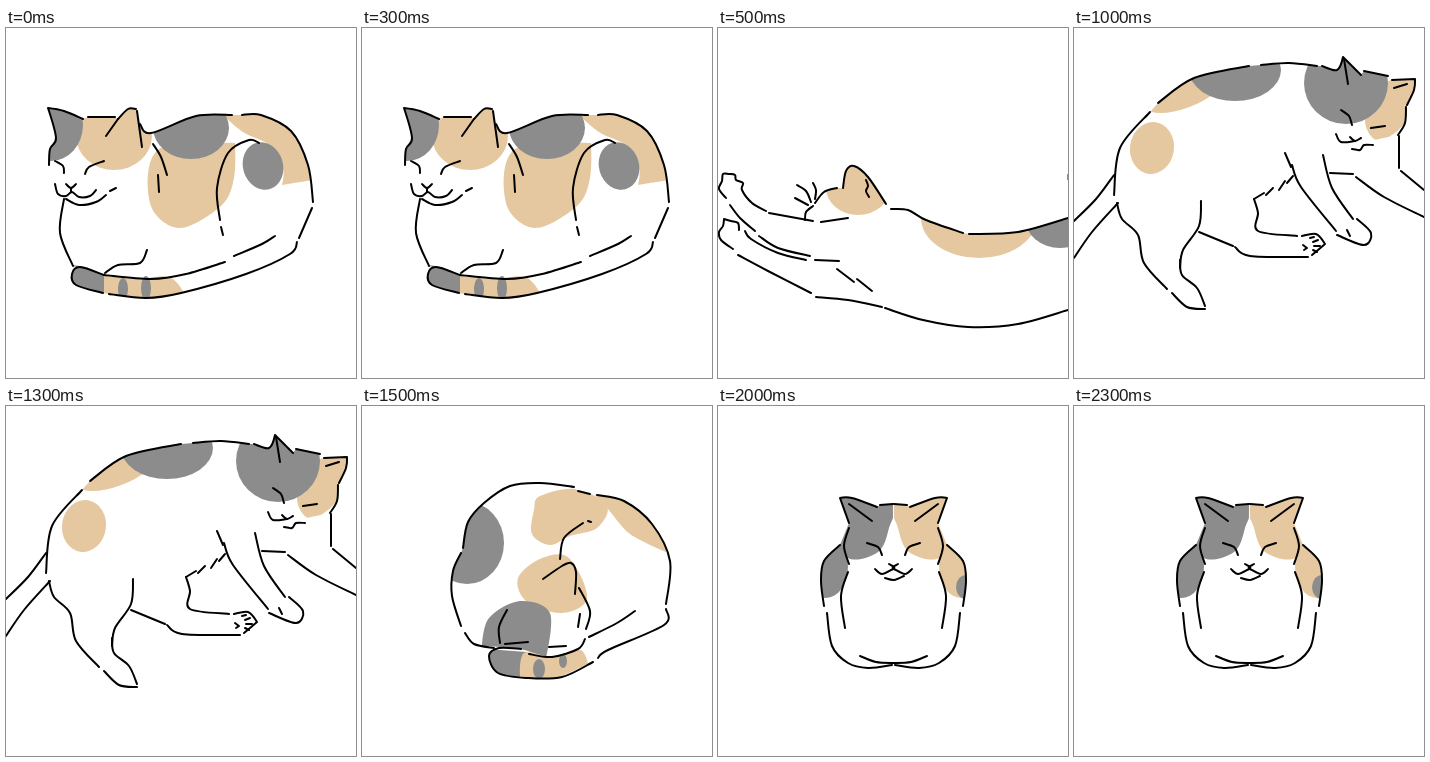
Recreate the animation shown at these times as an HTML page with a canvas. Size 350x350 px, loop 2.5 s.

```html
<!DOCTYPE html>
<html lang="en">
<head>
<meta charset="utf-8">
<title>Calico cat</title>
<style>
html, body { margin: 0; width: 100%; height: 100%; overflow: hidden; background: #fff; }
canvas { display: block; width: 100vw; height: 100vh; }
</style>
</head>
<body>
<canvas></canvas>
<script>
const SIZE = 350, HOLD = 500, GREY = '#8c8c8c', TAN = '#e5c8a0';
const canvas = document.querySelector('canvas');
const ctx = canvas.getContext('2d');
const ratio = window.devicePixelRatio || 1;
canvas.width = canvas.height = SIZE * ratio;
let region;

// Smooth curve through x,y pairs; turns sharper than a right angle stay corners.
function trace(path, coords, closed) {
  const n = coords.length / 2;
  const at = i => {
    const k = closed ? (i + n) % n : Math.max(0, Math.min(n - 1, i));
    return [coords[2 * k], coords[2 * k + 1]];
  };
  const handle = (i, side) => {
    const [ax, ay] = at(i - 1), [x, y] = at(i), [bx, by] = at(i + 1);
    const corner = (x - ax) * (bx - x) + (y - ay) * (by - y) < 0;
    const pull = corner ? 0 : side / 6;
    return [x + (bx - ax) * pull, y + (by - ay) * pull];
  };
  path.lineTo(...at(0));
  for (let i = 0; i < (closed ? n : n - 1); i++) {
    path.bezierCurveTo(...handle(i, 1), ...handle(i + 1, -1), ...at(i + 1));
  }
}

function ink(...coords) {
  const path = new Path2D();
  trace(path, coords);
  ctx.stroke(path);
}

// An ink line that also bounds the fur patches.
function edge(...coords) {
  ink(...coords);
  trace(region, coords);
}

// Patches lie below the ink and below earlier patches.
function paint(color, path) {
  ctx.save();
  ctx.clip(region);
  ctx.globalCompositeOperation = 'destination-over';
  ctx.fillStyle = color;
  ctx.fill(path);
  ctx.restore();
}

function patch(color, ...coords) {
  const path = new Path2D();
  trace(path, coords, true);
  paint(color, path);
}

function oval(color, x, y, rx, ry, turn = 0) {
  const path = new Path2D();
  path.ellipse(x, y, rx, ry, turn, 0, 2 * Math.PI);
  paint(color, path);
}

function poly(color, ...coords) {
  const path = new Path2D();
  for (let i = 0; i < coords.length; i += 2) path.lineTo(coords[i], coords[i + 1]);
  paint(color, path);
}

function loaf() {
  edge(43, 137, 44, 121, 50, 110, 42, 80, 58, 83, 77, 91);
  edge(82, 89, 109, 89);
  edge(112, 91, 122, 81, 130, 81);
  edge(134, 96, 145, 105, 190, 88, 226, 87);
  edge(236, 87, 255, 87, 285, 103, 302, 137, 307, 174);
  edge(306, 180, 293, 210);
  edge(291, 214, 284, 226, 240, 246, 175, 265, 140, 270, 103, 266);
  edge(97, 265, 70, 257, 66, 246, 74, 239, 98, 247);
  edge(67, 238, 54, 205, 58, 171);
  // face
  ink(100, 108, 112, 91);
  ink(131, 83, 136, 119);
  ink(49, 133, 57, 138, 58, 145);
  ink(79, 146, 83, 139, 98, 133);
  ink(60, 156, 65, 160, 70, 156);
  ink(65, 160, 65, 164);
  ink(49, 156, 52, 166, 60, 168, 66, 164, 73, 169, 84, 168, 90, 162);
  ink(60, 171, 73, 177, 90, 174, 100, 167);
  ink(104, 163, 110, 160);
  // body and tail
  ink(147, 116, 155, 129, 161, 147);
  ink(152, 147, 153, 164);
  ink(253, 115, 243, 112, 222, 125, 211, 160, 214, 192);
  ink(215, 199, 217, 207);
  ink(99, 245, 112, 237, 134, 235, 141, 222);
  ink(98, 247, 145, 251, 180, 246, 219, 234);
  ink(228, 228, 256, 216, 269, 208);
  oval(GREY, 45, 97, 32, 36);
  oval(GREY, 185, 100, 38, 31);
  oval(GREY, 257, 138, 20, 24, -0.3);
  poly(GREY, 98, 247, 98, 270, 50, 270, 60, 236, 80, 239);
  oval(GREY, 117, 261, 5, 11);
  oval(GREY, 140, 260, 5, 12);
  oval(TAN, 108, 108, 38, 34);
  patch(TAN, 153, 121, 229, 115, 228, 150, 215, 178, 173, 200, 144, 175);
  patch(TAN, 215, 85, 237, 104, 265, 118, 277, 140, 276, 157, 320, 150, 290, 80);
  patch(TAN, 97, 247, 130, 251, 163, 249, 178, 265, 140, 275, 97, 268);
}

function stretch() {
  edge(97, 175, 106, 164, 119, 160);
  edge(125, 160, 128, 143, 136, 138, 150, 149, 168, 176);
  edge(173, 181, 190, 182, 208, 192, 245, 205);
  edge(251, 206, 300, 204, 350, 190);
  edge(350, 282, 300, 296, 250, 299, 205, 292, 167, 280);
  // face
  ink(79, 157, 88, 163, 93, 174);
  ink(95, 155, 98, 162, 97, 171);
  ink(77, 170, 90, 177);
  ink(87, 192, 88, 184, 95, 178);
  ink(148, 152, 150, 158, 148, 163, 151, 169);
  ink(103, 194, 130, 190);
  // front legs
  ink(8, 170, 1, 161, 4, 153, 5, 146, 11, 146, 17, 147, 18, 152, 25, 155, 24, 162, 34, 175, 48, 183);
  ink(51, 185, 95, 193);
  ink(12, 177, 22, 190, 37, 203);
  ink(41, 208, 60, 220, 92, 228);
  ink(97, 232, 121, 233);
  ink(27, 203, 33, 211, 60, 225, 88, 232);
  ink(15, 221, 3, 212, 1, 204, 5, 198, 6, 191, 13, 193, 20, 195, 21, 202);
  ink(20, 227, 50, 243, 93, 265);
  ink(98, 269, 130, 272, 164, 279);
  ink(119, 241, 136, 254);
  ink(139, 251, 154, 263);
  oval(GREY, 342, 190, 35, 30);
  oval(TAN, 140, 160, 32, 27);
  oval(TAN, 261, 190, 58, 40);
  ctx.fillStyle = GREY;
  ctx.fillRect(349, 146, 1, 6);
}

function sprawl() {
  edge(40, 167, 46, 120, 76, 84);
  edge(84, 75, 120, 50, 175, 38);
  edge(187, 37, 215, 35, 243, 38);
  edge(248, 38, 263, 42, 269, 29, 287, 47);
  edge(290, 43, 314, 48);
  edge(318, 52, 341, 51, 340, 62, 333, 77);
  edge(332, 79, 331, 95, 324, 107);
  // face
  ink(270, 31, 274, 56);
  ink(320, 60, 333, 56);
  ink(267, 82, 275, 88, 278, 97);
  ink(297, 100, 311, 98);
  ink(276, 109, 281, 113, 287, 110);
  ink(262, 106, 267, 114, 281, 113);
  ink(278, 121, 286, 122, 290, 117, 299, 117);
  // tail and hind legs
  ink(40, 147, 22, 171, 0, 193);
  ink(44, 175, 18, 204, 0, 230);
  ink(43, 175, 48, 191, 64, 207, 70, 235, 93, 261);
  ink(98, 265, 113, 279, 131, 281);
  ink(131, 278, 123, 260, 108, 247, 106, 232);
  ink(127, 173, 125, 198, 109, 222, 106, 240);
  ink(125, 204, 159, 218);
  ink(161, 219, 176, 228, 234, 229);
  ink(180, 171, 184, 185, 184, 203, 223, 208);
  ink(228, 208, 242, 206, 251, 216, 238, 227);
  ink(229, 217, 233, 220, 230, 222);
  ink(236, 210, 240, 209);
  ink(239, 214, 244, 212);
  ink(240, 218, 246, 218);
  ink(239, 222, 243, 224);
  // belly and front legs
  ink(180, 171, 190, 165);
  ink(192, 167, 199, 160);
  ink(205, 162, 211, 153);
  ink(213, 155, 219, 148);
  ink(211, 125, 217, 139);
  ink(218, 137, 227, 159, 262, 203);
  ink(249, 127, 258, 160, 279, 191);
  ink(283, 191, 297, 205, 290, 217, 263, 207);
  ink(273, 202, 276, 208);
  ink(256, 145, 279, 146);
  ink(282, 149, 310, 169, 350, 189);
  ink(325, 108, 325, 140);
  ink(327, 143, 350, 162);
  oval(GREY, 161, 42, 46, 31);
  oval(GREY, 272, 55, 42, 41);
  oval(TAN, 110, 66, 40, 14, -0.35);
  oval(TAN, 78, 120, 22, 26, 0.15);
  patch(TAN, 345, 45, 333, 90, 315, 109, 300, 111, 291, 92, 300, 60);
}

function curl() {
  edge(101, 142, 106, 116, 122, 97, 148, 80, 178, 77, 212, 81);
  edge(216, 85, 228, 88);
  edge(235, 89, 262, 95, 290, 118, 308, 155, 304, 198);
  edge(304, 203, 302, 219, 246, 244, 236, 252);
  edge(231, 256, 200, 271, 165, 272, 136, 267, 127, 250, 137, 242, 159, 243);
  edge(132, 242, 112, 238, 103, 227);
  edge(99, 220, 90, 190, 91, 165, 99, 147);
  ink(167, 248, 190, 251, 216, 243, 223, 233);
  ink(187, 241, 204, 240);
  ink(227, 231, 255, 217, 273, 205);
  ink(145, 204, 137, 221, 138, 237);
  ink(143, 238, 166, 236);
  ink(198, 153, 202, 132, 221, 117);
  ink(226, 115, 229, 116);
  ink(181, 173, 200, 160, 209, 157, 214, 166, 213, 188);
  ink(217, 182, 228, 205, 224, 223);
  ink(218, 208, 216, 221);
  oval(GREY, 177, 263, 6, 10);
  oval(GREY, 201, 255, 4, 7);
  patch(TAN, 162, 247, 190, 251, 218, 244, 226, 258, 185, 275, 158, 272);
  oval(GREY, 105, 137, 37, 41);
  patch(GREY, 120, 240, 127, 212, 158, 195, 188, 207, 184, 252, 158, 243);
  poly(GREY, 125, 243, 165, 246, 159, 275, 120, 275);
  patch(TAN, 178, 90, 214, 83, 245, 100, 235, 122, 208, 130, 188, 139, 170, 128, 172, 104);
  patch(TAN, 228, 84, 246, 103, 268, 128, 304, 146, 320, 110);
  patch(TAN, 156, 172, 180, 152, 207, 152, 225, 192, 200, 207, 165, 196);
}

function halfFront(color, spotted) {
  region = new Path2D();
  edge(175, 98, 162, 99);
  edge(159, 101, 134, 92, 122, 92, 131, 117);
  edge(122, 139, 106, 155, 103, 175, 106, 200);
  edge(109, 207, 114, 240, 130, 257, 150, 262, 174, 259);
  ink(131, 98, 154, 115);
  ink(131, 122, 126, 140, 131, 158);
  ink(149, 137, 160, 141, 164, 149);
  ink(171, 158, 176, 161, 176, 163);
  ink(157, 163, 164, 168, 175, 163);
  ink(130, 166, 123, 190, 127, 222);
  ink(142, 250, 158, 256, 176, 257);
  if (spotted) oval(GREY, 103, 181, 10, 12);
  patch(color, 174, 95, 171, 122, 160, 146, 130, 152, 115, 120, 115, 85);
  oval(color, 108, 160, 22, 32);
}

function front() {
  halfFront(GREY, false);
  ink(167, 172, 176, 174, 186, 170);
  ctx.translate(351, 0);
  ctx.scale(-1, 1);
  halfFront(TAN, true);
}

const poses = [loaf, stretch, sprawl, curl, front];
const start = performance.now();

function draw() {
  const step = Math.floor((performance.now() - start) / HOLD);
  ctx.setTransform(ratio, 0, 0, ratio, 0, 0);
  ctx.clearRect(0, 0, SIZE, SIZE);
  ctx.lineWidth = 2;
  ctx.lineCap = ctx.lineJoin = 'round';
  region = new Path2D();
  poses[step % poses.length]();
  requestAnimationFrame(draw);
}
draw();
</script>
</body>
</html>
```
